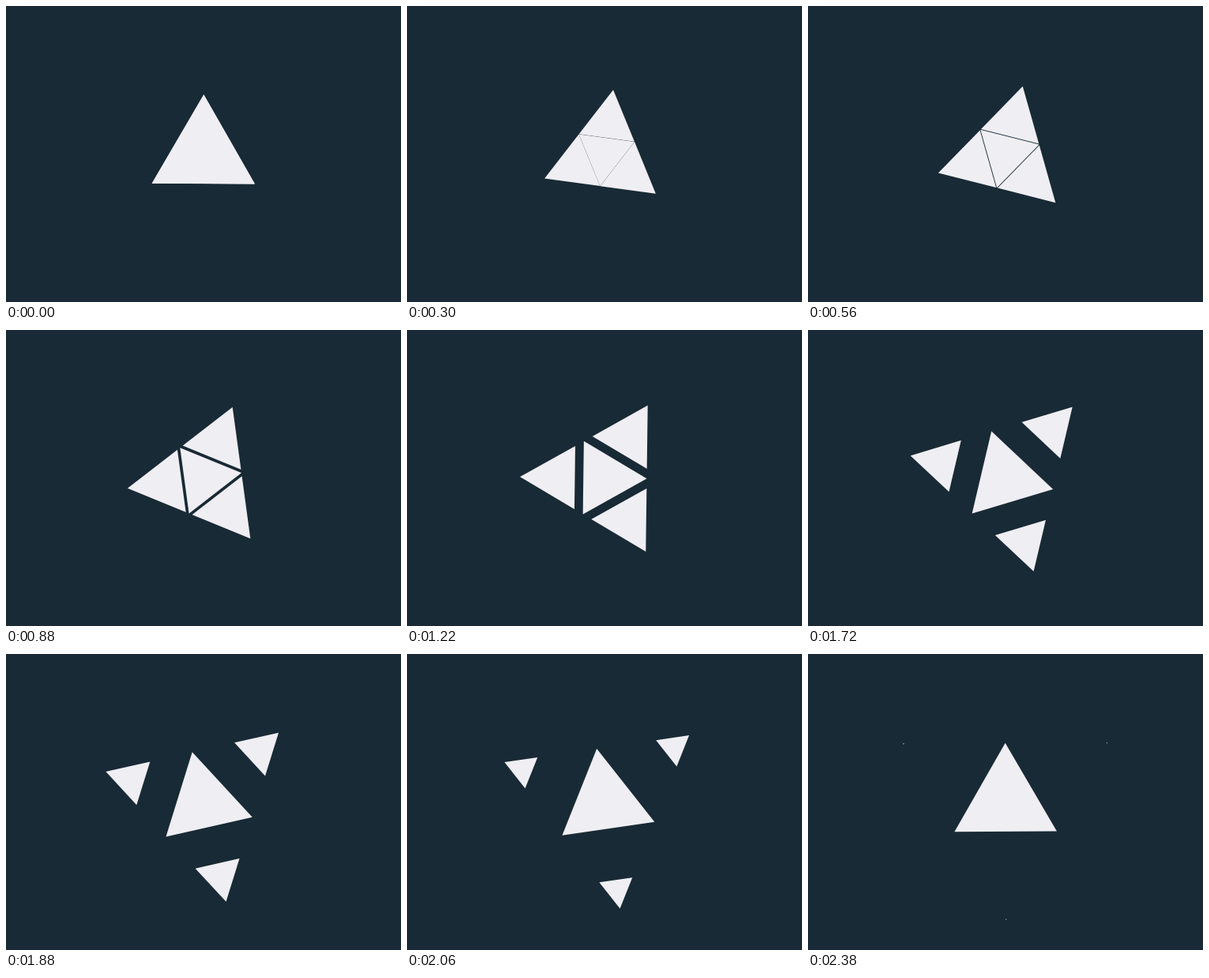
These frames come from a looping animation (500x375 px, 2400 ms). An HTML page with a canvas:

```html
<!DOCTYPE html>
<html lang="en">
<head>
<meta charset="utf-8">
<title>Splitting triangle</title>
<style>
  html, body { margin: 0; width: 100%; height: 100%; overflow: hidden; background: #182a35; }
  canvas { display: block; }
</style>
</head>
<body>
<canvas id="stage" width="500" height="375"></canvas>
<script>
const ctx = document.getElementById('stage').getContext('2d');
const LOOP = 2400, STEP = 20;
const CX = 250, CY = 187.5, RADIUS = 37.5;
const THIRD = Math.PI * 2 / 3;

// Equilateral triangle; angle 0 points up, positive is clockwise.
function triangle(x, y, radius, angle) {
  ctx.beginPath();
  for (let i = 0; i < 3; i++) {
    const a = angle + i * THIRD;
    ctx.lineTo(x + radius * Math.sin(a), y - radius * Math.cos(a));
  }
  ctx.fill();
}

function draw(ms) {
  // Each step shows the pose at its midpoint.
  const step = Math.floor((ms % LOOP) / STEP + 0.001);
  const t = ((step + 0.5) * STEP / LOOP) % 1;
  const angle = t * Math.PI / 3;
  const size = RADIUS * 2 ** t;
  const spread = t ** 3;

  ctx.fillStyle = '#182a35';
  ctx.fillRect(0, 0, 500, 375);
  ctx.fillStyle = '#efeef3';

  triangle(CX, CY, size, angle + Math.PI);
  for (let i = 0; i < 3; i++) {
    const a = angle + i * THIRD;
    const distance = size * (1 + spread);
    triangle(CX + distance * Math.sin(a), CY - distance * Math.cos(a), size * (1 - spread), angle);
  }

  // Cover the hairline seams while the pieces still touch.
  if (spread < 0.001) triangle(CX, CY, size * 2, angle);
}

function tick() {
  draw(performance.now());
  requestAnimationFrame(tick);
}
tick();
</script>
</body>
</html>
```
